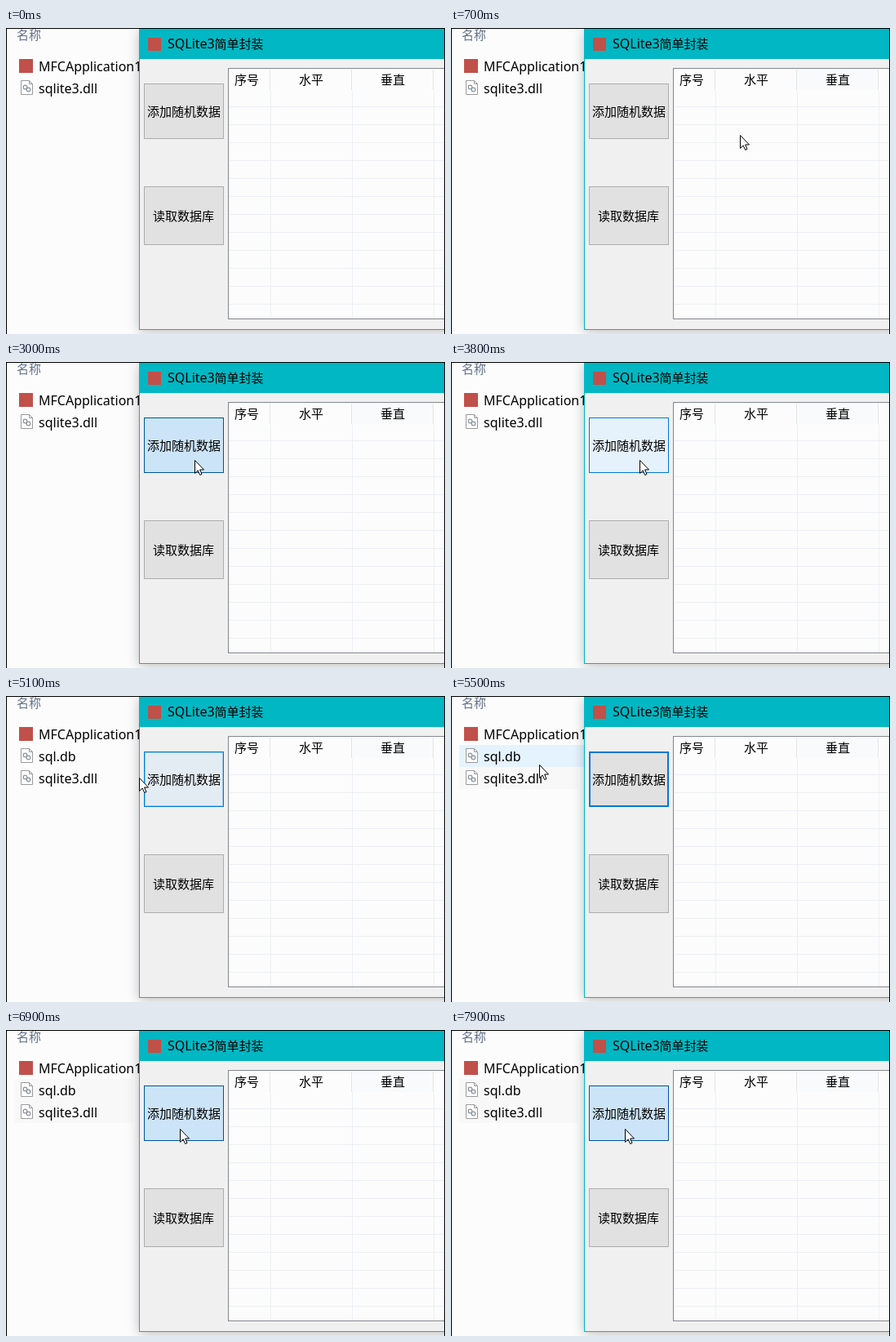
Animation, 538 px wide and 375 px high, one loop 8 s. Source, as an HTML page with a canvas:

```html
<!DOCTYPE html>
<html lang="zh-CN">
<head>
<meta charset="utf-8">
<style>
html, body { margin: 0; width: 100%; height: 100%; overflow: hidden; background: #fcfcfc; }
canvas { display: block; }
</style>
</head>
<body>
<canvas id="stage" width="538" height="375"></canvas>
<script>
const ctx = document.getElementById('stage').getContext('2d');
const LOOP = 8000, STEP = 100, FADE = 300;
const CJK = '15px "Noto Sans CJK SC", "Noto Sans CJK", sans-serif';
const LATIN = '16px "Noto Sans", sans-serif';
const TEAL = '#00b7c3', ICON = '#c0504a', ROW_HOVER = '#e5f3ff', ROW_VISITED = '#f8f8f8';

const CURSOR_START = { x: 468, y: 68, time: 400 };
const MOVES = [
  { from: 400, to: 700, x: 354, y: 131 },
  { from: 1300, to: 1800, x: 230, y: 163 },
  { from: 2100, to: 2500, x: 231, y: 120 },
  { from: 4900, to: 5800, x: 103, y: 83 },
  { from: 5800, to: 6000, x: 122, y: 79 },
  { from: 6200, to: 6650, x: 213, y: 123 },
  { from: 6700, to: 6900, x: 213, y: 121 }
];

const STATES = {
  normal:  { fill: '#e1e1e1', border: '#adadad', width: 1 },
  hot:     { fill: '#e5f1fb', border: '#0078d7', width: 1 },
  pressed: { fill: '#cce4f7', border: '#005499', width: 1 },
  focused: { fill: '#e1e1e1', border: '#0078d7', width: 2 }
};
const STATE_CHANGES = [
  [2200, 'hot'], [3000, 'pressed'], [3200, 'hot'], [5000, 'focused'],
  [6300, 'hot'], [6900, 'pressed'], [7300, 'hot'], [7900, 'pressed']
];

const progress = (t, from, to) => Math.min(1, Math.max(0, (t - from) / (to - from)));
const easeOut = p => 1 - (1 - p) ** 3;

function cursorAt(t) {
  let { x, y } = CURSOR_START;
  for (const move of MOVES) {
    const p = easeOut(progress(t, move.from, move.to));
    x += (move.x - x) * p;
    y += (move.y - y) * p;
  }
  return { x: Math.round(x), y: Math.round(y) };
}

function rect(x, y, w, h, color) {
  ctx.fillStyle = color;
  ctx.fillRect(x, y, w, h);
}

function frameRect(x, y, w, h, color, width = 1) {
  ctx.strokeStyle = color;
  ctx.lineWidth = width;
  ctx.strokeRect(x + width / 2, y + width / 2, w - width, h - width);
}

function text(string, x, y, font = CJK, color = '#000') {
  ctx.font = font;
  ctx.fillStyle = color;
  ctx.fillText(string, x, y);
}

function faded(alpha, draw) {
  ctx.save();
  ctx.globalAlpha = alpha;
  draw();
  ctx.restore();
}

function shape(path, x, y, fill, stroke) {
  const outline = new Path2D(path);
  ctx.save();
  ctx.translate(x + .5, y + .5);
  ctx.fillStyle = fill;
  ctx.strokeStyle = stroke;
  ctx.lineWidth = 1;
  ctx.fill(outline);
  ctx.stroke(outline);
  ctx.restore();
}

function ring(x, y, radius) {
  ctx.beginPath();
  ctx.arc(x, y, radius, 0, 2 * Math.PI);
  ctx.strokeStyle = '#8d979f';
  ctx.lineWidth = 1.3;
  ctx.stroke();
}

function fileRow(name, y, background) {
  if (background) rect(10, y - 4, background === ROW_HOVER ? 153 : 145, 27, background);
  shape('M0 0H10L14 4V17H0Z', 18, y, '#fff', '#9a9a9a');
  shape('M10 0V4H14Z', 18, y, '#eee', '#9a9a9a');
  ring(23.5, y + 8.5, 2.3);
  ring(27.5, y + 11.5, 2.3);
  text(name, 40, y + 16, LATIN);
}

function drawFiles(t) {
  const { x, y } = cursorAt(t);
  const background = (top, visitedAt) =>
    x < 163 && y >= top && y < top + 27 ? ROW_HOVER : t >= visitedAt && ROW_VISITED;
  const sorted = t >= 4700;

  text('名称', 13, 14, CJK, '#61708a');
  rect(16, 38, 17, 17, ICON);
  text('MFCApplication1', 40, 53, LATIN);
  fileRow(sorted ? 'sql.db' : 'sqlite3.dll', 64, background(60, 6300));
  if (t >= 4200) fileRow(sorted ? 'sqlite3.dll' : 'sql.db', 91, background(87, 5300));
}

function drawWindow() {
  ctx.save();
  ctx.shadowColor = 'rgba(0,0,0,.25)';
  ctx.shadowBlur = 14;
  ctx.shadowOffsetY = 2;
  rect(163, 1, 400, 369, TEAL);
  ctx.restore();
  rect(164, 38, 374, 331, '#f0f0f0');
  rect(174, 12, 16, 16, ICON);
  text('SQLite3', 198, 25, LATIN);
  text('简单封装', 255.5, 25);
}

function drawTable(t) {
  rect(273, 50, 265, 306, '#fcfcfc');
  frameRect(272, 49, 300, 308, '#828790');
  for (let y = 96; y < 356; y += 22) rect(273, y, 265, 1, '#ecf0f2');
  for (let x = 324; x < 538; x += 100) {
    rect(x, 77, 1, 279, '#ecf0f2');
    rect(x - 1, 51, 1, 25, '#e5e5e5');
  }
  if (t >= CURSOR_START.time) {
    rect(424, 51, 99, 25, '#f8fafc');
    faded(1 - progress(t, 400, 400 + FADE), () => rect(424, 51, 99, 25, '#d9ebf9'));
  }
  text('序号', 280, 69);
  text('水平', 359, 69);
  text('垂直', 459, 69);
}

function buttonFace(y, h, { fill, border, width }) {
  rect(169 + width, y + width, 98 - 2 * width, h - 2 * width, fill);
  frameRect(169, y, 98, h, border, width);
}

function drawButtons(t) {
  buttonFace(68, 68, STATES.normal);
  for (const [start, state] of STATE_CHANGES) {
    const alpha = state === 'pressed' ? +(t >= start) : progress(t, start, start + FADE);
    faded(alpha, () => buttonFace(68, 68, STATES[state]));
  }
  buttonFace(194, 72, STATES.normal);
  text('添加随机数据', 173, 108);
  text('读取数据库', 180, 236);
}

function drawCursor(t) {
  if (t < CURSOR_START.time) return;
  const { x, y } = cursorAt(t);
  shape('M0 0V16L3.7 12.5L6.2 18L8.5 17L6.1 11.5H11Z', x, y, '#fff', '#000');
}

function frame(now) {
  const t = Math.floor(now % LOOP / STEP) * STEP;
  rect(0, 0, 538, 375, '#fcfcfc');
  drawFiles(t);
  drawWindow();
  drawTable(t);
  drawButtons(t);
  drawCursor(t);
  frameRect(0, 0, 538, 400, '#000');
  requestAnimationFrame(frame);
}
requestAnimationFrame(frame);
</script>
</body>
</html>
```
